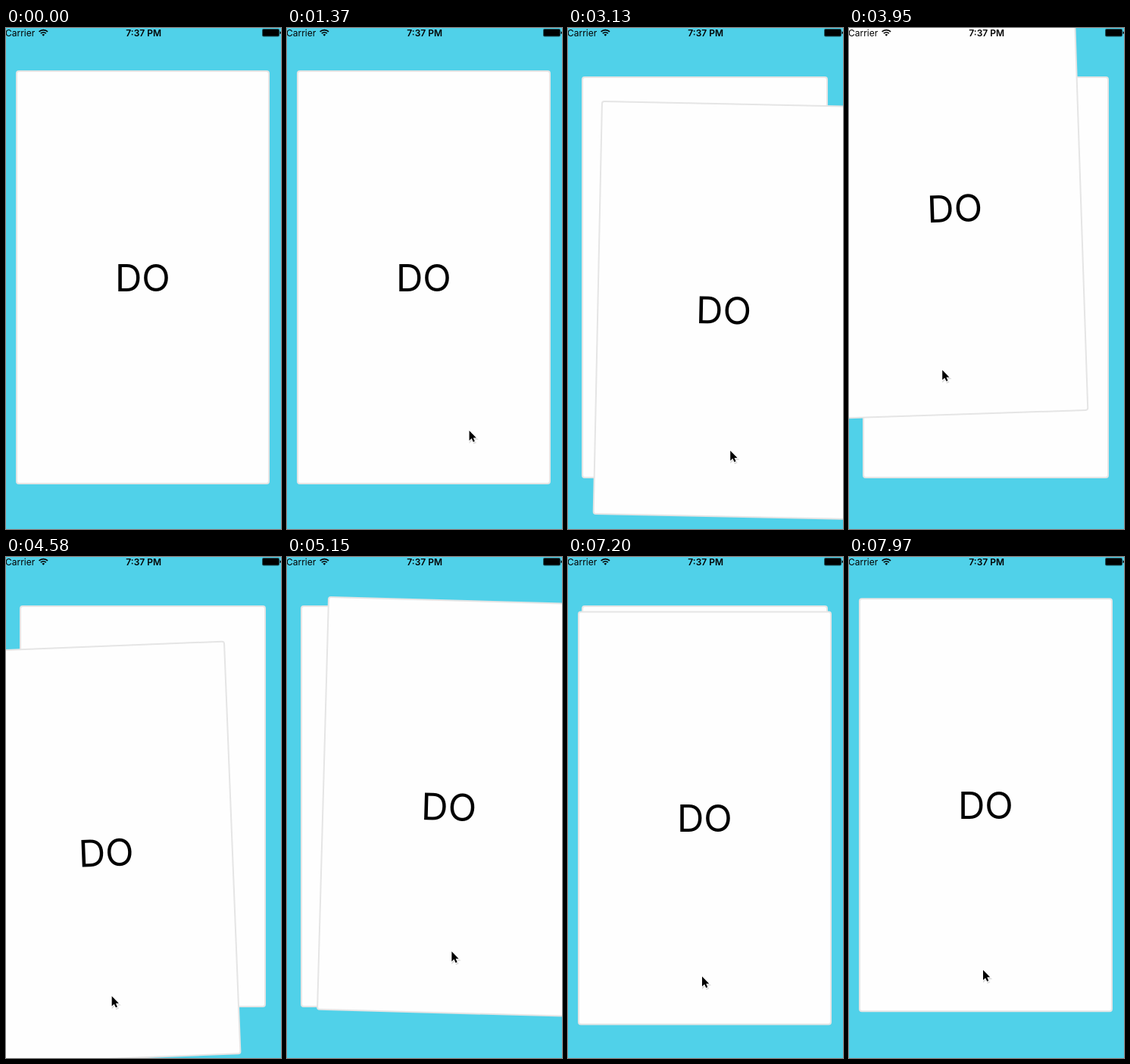
Animation, 363 px wide and 662 px high, one loop 8 s. Source, as an HTML page:

```html
<!DOCTYPE html>
<html lang="en">
<head>
<meta charset="utf-8">
<title>Card drag</title>
<style>
html, body { margin: 0; width: 100%; height: 100%; overflow: hidden; background: #50d1e9; }
svg { display: block; width: 363px; height: 662px; font-family: Inter, Roboto, sans-serif; }
.card { fill: #fefefe; stroke: #e5e5e5; stroke-width: 2; }
</style>
</head>
<body>
<svg viewBox="0 0 363 662">
  <rect class="card" x="19" y="65" width="323" height="529" rx="3"/>
  <g id="card">
    <rect class="card" x="14" y="57" width="333" height="545" rx="3"/>
    <text x="180.3" y="347.5" font-size="49" text-anchor="middle">DO</text>
  </g>
  <g font-size="12">
    <text x="-1" y="10.6">Carrier</text>
    <text x="181.7" y="10.6" font-weight="600" text-anchor="middle">7:37 PM</text>
  </g>
  <g fill="none" stroke="#000" stroke-width="1.7">
    <path d="M43.6 4.9a8.3 8.3 0 0 1 11.4 0M45.8 7.2a5.1 5.1 0 0 1 7 0"/>
    <path d="M49.3 10.8L47.4 8.8a2.8 2.8 0 0 1 3.8 0z" fill="#000" stroke="none"/>
  </g>
  <rect x="338" y="1" width="23" height="10.5" rx="2" opacity=".6"/>
  <rect x="339" y="2" width="21" height="8.5" rx="1"/>
  <path d="M361.5 4.3q1.5 .4 1.5 2t-1.5 2z"/>
  <g id="cursor">
    <path d="M1 2V17L4.5 13.7L7 19L9.3 18L7 12.8H11.5Z" stroke="#000" stroke-width="2" opacity=".13"/>
    <path d="M0 0V15L3.5 11.7L6 17L8.3 16L6 10.8H10.5Z" stroke="#fff" stroke-width="2" paint-order="stroke"/>
  </g>
</svg>
<script>
const LOOP = 8000, LAST = 7970, ENTER = 660, LAG = 80, TURN = 0.047;

// Turning points of the drag on each axis: time, offset
const turnsX = [[2020, 0], [2330, 22], [2690, -36], [3360, 47], [4250, -70.5],
  [5400, 46.5], [5650, 46.5], [6340, -52], [6560, 0]];
const turnsY = [[2020, 0], [2620, -51], [3080, 45], [3840, -102], [4520, 62],
  [5260, -3], [7000, -5], [7500, 54], [7960, -2], [8150, 50]];

// Progress from 0 to 1 between two times, slow at both ends
function ease(t, from, to) {
  const u = Math.min(1, Math.max(0, (t - from) / (to - from)));
  return (1 - Math.cos(Math.PI * u)) / 2;
}

// Swing from each turning point to the next
const swing = (turns, t) => turns.slice(1).reduce((sum, [time, value], i) =>
  sum + (value - turns[i][1]) * ease(t, turns[i][0], time), 0);

const drag = t => [swing(turnsX, t), swing(turnsY, t)];

function approach(t) {
  const enter = ease(t, ENTER, 830), cross = ease(t, 1250, 1530), settle = ease(t, 1670, 1840);
  return [342 - 62 * enter - 100 * cross - 3 * settle, 541 - 23 * cross + 6 * settle];
}

const card = document.getElementById('card');
const cursor = document.getElementById('cursor');

function draw(t) {
  const [dx, dy] = drag(t);
  card.setAttribute('transform', `translate(${dx} ${dy}) rotate(${dx * TURN} 180.5 329.5)`);
  // The card trails the pointer
  const [px, py] = approach(t), [ox, oy] = drag(t + LAG);
  cursor.setAttribute('transform', `translate(${px + ox} ${py + oy}) scale(.88)`);
  cursor.setAttribute('visibility', t < ENTER ? 'hidden' : 'visible');
}

const start = performance.now();
function frame() {
  draw(Math.min((performance.now() - start) % LOOP, LAST));
  requestAnimationFrame(frame);
}
frame();
</script>
</body>
</html>
```
